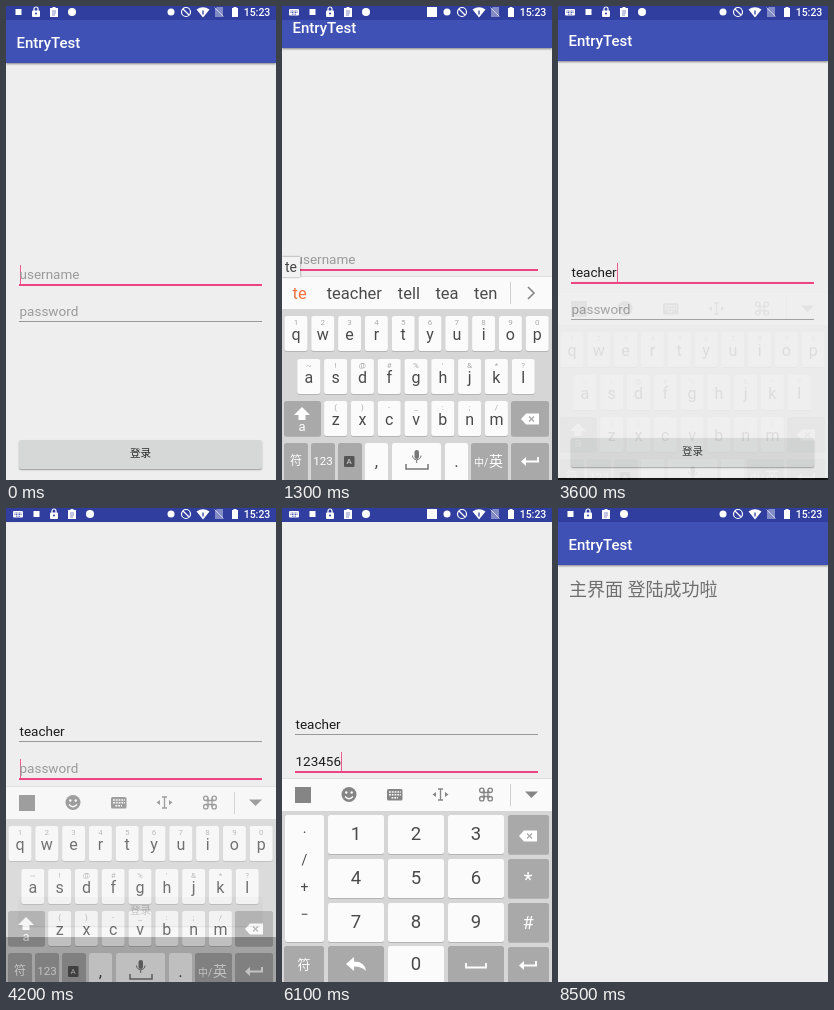
Animation, 270 px wide and 474 px high, one loop 9.4 s. Source, as an HTML page:

```html
<!DOCTYPE html>
<html lang="zh">
<head>
<meta charset="utf-8">
<title>Login form</title>
<style>
html, body { margin: 0; width: 100%; height: 100%; overflow: hidden; background: #000; }
body, svg text { font-family: Roboto, "Noto Sans CJK SC", "Noto Sans CJK", sans-serif; }
#stage { position: relative; width: 270px; height: 474px; overflow: hidden; background: #000; }
#stage > *, .screen > * { position: absolute; box-sizing: border-box; }
.screen { left: 0; top: 0; width: 270px; height: 474px; background: #eee; }
.bar {
  left: 0; top: 0; width: 270px; height: 57px; padding: 17px 0 0 10.5px;
  background: #3f51b5; color: #fff; font-size: 15px; font-weight: 500; line-height: 40px;
  box-shadow: 0 1px 2px rgba(0, 0, 0, .45);
}
.field { left: 13.5px; width: 242px; height: 20px; display: flex; align-items: center;
  font-size: 13.5px; line-height: 20px; color: #1c1c1c; white-space: pre; }
.field i { width: 1px; height: 19px; margin-right: -1px; background: #f0588f; visibility: hidden; }
.field b { font-weight: 400; color: #9a9a9a; }
.field::after { content: ""; position: absolute; left: -.5px; right: 0; top: 20px; height: 1px; background: #989898; }
.field.focus::after { height: 1.7px; background: #ec4581; }
.field.on i { visibility: visible; }
#user { top: 258px; }
#pass { top: 295px; }
#login {
  left: 13px; top: 434px; width: 243px; height: 29px; border-radius: 2px; background: #d6d7d7;
  box-shadow: 0 1px 1.5px rgba(0, 0, 0, .35);
  font-size: 10.5px; line-height: 28px; text-align: center; color: #222; font-weight: 500;
}
#login.down { background: #c3c4c4; }
#home p { margin: 0; left: 11px; top: 69px; font-size: 18px; line-height: 26px; color: #6f6f6f; white-space: pre; }
#kbd { left: 0; top: 270px; overflow: visible; }
#kbd text, #status text { text-anchor: middle; }
#kbd #words { text-anchor: start; }
#status { left: 0; top: 0; background: #303f9f; }
#popup {
  left: 0; top: 251px; height: 20px; padding: 0 3px; background: #f3f3f3; color: #444;
  font-size: 14px; line-height: 20px; box-shadow: 0 0 2px rgba(0, 0, 0, .5);
}
</style>
</head>
<body>
<div id="stage">
  <div class="screen" id="form">
    <div class="bar">EntryTest</div>
    <div class="field" id="user"><span></span><i></i><b>username</b></div>
    <div class="field" id="pass"><span></span><i></i><b>password</b></div>
    <div id="login">登录</div>
  </div>
  <div class="screen" id="home">
    <div class="bar">EntryTest</div>
    <p>主界面 登陆成功啦</p>
  </div>
  <svg id="kbd" width="270" height="204" viewBox="0 270 270 204"></svg>
  <div id="popup"></div>
  <svg id="status" width="270" height="14" fill="#fff">
    <g id="imeIcon">
      <rect x="7" y="3" width="10" height="6.5" rx="1"/>
      <path d="M8.5 5h7M8.5 6.5h7M10 8.2h4" stroke="#303f9f" stroke-width=".8" stroke-dasharray="1 .5"/>
    </g>
    <g id="notes">
      <rect x="9.5" y="3" width="6" height="6"/>
      <path d="M28 5V3a2 2 0 0 1 4 0v2" fill="none" stroke="#fff" stroke-width="1.2"/>
      <rect x="26" y="4.5" width="8" height="6.5" rx="1"/>
      <circle cx="30" cy="7.6" r="1" fill="#303f9f"/>
      <path d="M44 2h2.500v-1h3v1H52v9h-8z"/>
      <path d="M46 5h4M46 7h4M46 9h3" stroke="#303f9f" stroke-width=".6"/>
      <circle cx="66" cy="6" r="4"/>
    </g>
    <rect id="imeMark" x="145" y="1" width="10" height="10"/>
    <circle cx="165" cy="6" r="3.500"/>
    <g fill="none" stroke="#fff" stroke-width="1.2"><circle cx="180" cy="6" r="4.500"/><path d="M177 3l6 6"/></g>
    <path d="M190.500 3.500q6.500-4.500 13 0L197 11.500z"/>
    <path d="M197 4.500v4" stroke="#303f9f" stroke-width="1.3"/>
    <path d="M209 3l2-2h6v10h-8z" opacity=".4"/>
    <path d="M208.500 1.500l9 9" stroke="#fff" stroke-width=".9" opacity=".7"/>
    <path d="M226 2h1.500V1h3v1h1.500v9h-6z"/>
    <text x="251" y="10" font-size="10.5" font-weight="500">15:23</text>
  </svg>
</div>
<script>
const $ = id => document.getElementById(id);
const LOOP = 9400;
const DARK = '#a9a9a9', LIGHT = '#fbfbfb', INK = '#4a4a4a', ORANGE = '#f0733f', ICON = '#858585';

// [key, pressed at, released at]
const LETTERS = [['t', 700, 900], ['e', 1100, 1300], ['a', 1600, 1700],
  ['c', 1900, 2000], ['h', 2100, 2200], ['e', 2300, 2400]];
const DIGITS = [5100, 5300, 5500, 5700, 5800, 6000].map((p, i) => [String(i + 1), p, p + 100]);
const COMMIT = 2900, TO_PASS = 4100, TO_DIGITS = 4900;
const CURSOR = [[0, 1100], [1600, 2100], [2600, 4600], [5100, 6600], [7000, 7500], [7800, LOOP]];
const WORDS = {
  t: 't the to that this',
  te: 'te teacher tell tea ten',
  tea: 'tea teacher team tears',
  teac: 'teac teacher teach',
  teach: 'teach teacher teaching',
  teache: 'teache teacher teachers'
};

// Keyboard moves: start, opening, pan before, pan after
const MOVES = [[-900, 0, 0, 0], [100, 1, 0, 15], [3500, 0, 15, 0], [TO_PASS, 1, 0, 52], [6400, 0, 52, 0]];
const PAN = [.35, .865, .98, 1];
const ALPHA = [[.6, .1, 0, 0], [.25, .76, 1, 1]];
const DROP = [[4, 16, 20, 20], [16, 8, 1, 0]];

const rect = (x, y, w, h, fill, more = '') =>
  `<rect x="${x}" y="${y}" width="${w}" height="${h}" fill="${fill}" ${more}/>`;
const text = (x, y, s, size, fill = INK) =>
  `<text x="${x}" y="${y + size * .35}" font-size="${size}" fill="${fill}">${s}</text>`;
const line = (d, color, w = 1.5) => `<path d="${d}" fill="none" stroke="${color}" stroke-width="${w}"/>`;
const key = (x, y, w, h, fill = LIGHT, name = '') =>
  rect(x, y + 1, w, h, '#b4b4b4', 'rx="2.5"') +
  rect(x, y, w, h, fill, `rx="2.5" data-key="${name}"`);

const backspace = (x, y) =>
  `<path d="M${x - 9} ${y}l5-5.500h13v11h-13z" fill="#fff"/>` +
  line(`M${x - 1} ${y - 2.5}l5 5m0-5l-5 5`, DARK, 1.3);
const enter = (x, y) =>
  line(`M${x + 8} ${y - 4}v4.500h-13`, '#fff', 2) +
  `<path d="M${x - 9} ${y + .5}l5-4.500v9z" fill="#fff"/>`;
const space = (x, y, color) => line(`M${x - 10} ${y - 2}v4.500h20v-4.500`, color, 1.8);

const ROWS = [
  ['qwertyuiop', '1234567890', 14, 310],
  ['asdfghjkl', "~!@#%'&*?", 26.8, 353],
  ['zxcvbnm', '()-_:;/', 53.6, 395]
];
const spot = {};

function letterKeys() {
  let s = '';
  for (const [chars, hints, x0, y] of ROWS) {
    [...chars].forEach((c, i) => {
      const x = x0 + i * 26.8;
      spot[c] = [x, y];
      s += key(x - 11.5, y, 23, 35, LIGHT, c) +
        text(x, y + 6, hints[i].replace('&', '&amp;'), 8, '#ababab') + text(x, y + 18.5, c, 16);
    });
  }
  s += key(2, 395, 37, 35, DARK) + '<path d="M20 401l8 8h-4.500v5h-7v-5H12z" fill="#fff"/>' + text(20, 420, 'a', 13, '#fff');
  s += key(229, 395, 38, 35, DARK) + backspace(248, 413);
  s += key(2, 437, 24, 40, DARK) + text(14, 455, '符', 12, '#fff');
  s += key(29, 437, 24, 40, DARK, '123') + text(41, 455, '123', 11.5, '#fff');
  s += key(56, 437, 24, 40, DARK) + rect(62, 450, 10.5, 11, '#555', 'rx="1"') + text(67.2, 455.5, 'A', 8, '#ddd');
  s += key(83, 437, 23, 40) + text(94.500, 455, ',', 17);
  s += key(110, 437, 49, 40) + rect(132.5, 444, 4.5, 9, '#777', 'rx="2.2"') +
    line('M130.500 449.500a4.200 4.200 0 0 0 8.500 0M134.700 454v3', '#777', 1) +
    line('M124 458v5h22v-5', '#777');
  s += key(163, 437, 23, 40) + text(174.5, 455, '.', 17);
  s += key(189, 437, 37, 40, DARK) + text(199, 456, '中/', 10, '#fff') + text(214, 455, '英', 14, '#fff');
  return s + key(229, 437, 38, 40, DARK) + enter(248, 455);
}

function digitKeys() {
  let s = key(3, 307, 39, 127);
  ['·', '/', '+', '−'].forEach((c, i) => s += text(22.5, 325 + i * 27, c, 14));
  for (let n = 1; n < 10; n++) {
    const x = 46 + (n - 1) % 3 * 60, y = 307 + Math.floor((n - 1) / 3) * 44;
    s += key(x, y, 56, 39, LIGHT, n) + text(x + 28, y + 19, n, 18.5);
  }
  for (let i = 0; i < 4; i++) s += key(226, 307 + i * 44, 41, 39, DARK);
  s += backspace(246, 328) + text(246, 372, '*', 20, '#fff') + text(246, 415, '#', 18, '#fff') + enter(246, 457);
  s += key(2, 438, 40, 40, DARK) + text(22, 456, '符', 13, '#fff');
  s += key(46, 438, 56, 40, DARK) +
    '<path d="M64 456l8-7v4.500q11 0 12 9.500q-4-4.500-12-4.500v4.500z" fill="#fff"/>';
  s += key(106, 438, 56, 40) + text(134, 456, '0', 18.5);
  return s + key(166, 438, 56, 40, DARK) + space(194, 457, '#fff');
}

function toolIcons() {
  let s = rect(13, 279, 16, 16, ICON);
  s += `<circle cx="67" cy="286.500" r="7.500" fill="${ICON}"/>` +
    '<circle cx="64.300" cy="284.500" r="1.200" fill="#fff"/><circle cx="69.700" cy="284.500" r="1.200" fill="#fff"/>' +
    line('M63 288.500q4 4.500 8 0', '#fff', 1.3);
  s += rect(105, 281, 15.5, 11.5, ICON, 'rx="1.5"') +
    '<path d="M107 284h12M107 286.700h12M109.500 289.800h6.500" stroke="#fff" stroke-width="1.400" stroke-dasharray="1.800 1"/>';
  s += line('M156 281h5m-5 11h5M158.500 281v11', ICON, 1.3) +
    `<path d="M154 284v5l-3.500-2.500zM163 284v5l3.500-2.500z" fill="${ICON}"/>`;
  const loop = (x, y) => `<circle cx="${x}" cy="${y}" r="2.200"/>`;
  s += `<g fill="none" stroke="${ICON}" stroke-width="1.300">` +
    [[199.8, 282.3], [208.2, 282.3], [199.8, 290.7], [208.2, 290.7]].map(p => loop(...p)).join('') +
    '<path d="M202 282v9M206 282v9M200 284.500h8M200 288.500h8"/></g>';
  return s + `<path d="M243 283.500h13l-6.500 6.500z" fill="${ICON}"/>`;
}

$('kbd').innerHTML =
  rect(0, 270, 270, 204, '#d6d6d6') + rect(0, 270, 270, 33, '#fafafa') +
  line('M0 270.500h270', '#dedede', 1) +
  `<g id="tools">${toolIcons()}</g>` +
  `<g id="picks">${rect(73, 271, 71, 32, '#e3e3e3', 'id="pickBg"')}
    <text id="words" x="10.500" y="293" font-size="16.500"></text>${line('M246 281l6 6-6 6', ICON, 1.6)}</g>` +
  line('M228.500 276v22', '#cfcfcf', 1) +
  `<g id="abc">${letterKeys()}</g><g id="num">${digitKeys()}</g><g id="bubble"></g>`;

const show = (id, on) => { $(id).style.display = on ? '' : 'none'; };
const within = (t, [a, b]) => t >= a && t < b;
const typed = (list, t) => list.filter(k => k[2] <= t).map(k => k[0]).join('');
const held = (list, t) => (list.find(k => within(t, [k[1], k[2]])) || [''])[0];
const keys = [...document.querySelectorAll('[data-key]')].filter(k => k.dataset.key);
keys.forEach(k => { k.base = k.getAttribute('fill'); });

function setField(id, value, focus, cursor) {
  const f = $(id);
  f.children[0].textContent = value;
  f.children[2].style.display = value ? 'none' : '';
  f.classList.toggle('focus', focus);
  f.classList.toggle('on', focus && cursor);
}

function drawKeyboard(t) {
  const [start, open, from, to] = MOVES.filter(m => m[0] <= t).pop();
  const k = Math.min(3, (t - start) / 100);
  $('form').style.transform = `translateY(${-(from + (to - from) * PAN[k])}px)`;
  $('kbd').style.opacity = ALPHA[open][k];
  $('kbd').style.transform = `translateY(${DROP[open][k]}px)`;
  const icon = start > 0 && (open ? k >= 1 : k < 2);
  show('imeIcon', icon);
  $('notes').setAttribute('transform', `translate(${icon ? 18 : 0})`);
  show('imeMark', start > 0 && (open ? k >= 2 : k < 1));
  show('abc', t < TO_DIGITS);
  show('num', t >= TO_DIGITS);

  const letter = held(LETTERS, t);
  const down = letter || held(DIGITS, t) || (within(t, [4800, TO_DIGITS]) ? '123' : '');
  keys.forEach(e => e.setAttribute('fill', e.dataset.key === down ? (down === '123' ? '#8c8c8c' : '#c9c9c9') : e.base));
  if (letter) {
    const [x, y] = spot[letter];
    $('bubble').innerHTML = rect(x - 18, y - 38, 36, 36, '#fff', 'rx="3" stroke="#bbb" stroke-width=".8"') +
      text(x, y - 20, letter, 22);
  } else $('bubble').innerHTML = '';
}

function drawWords(t) {
  const draft = t < COMMIT ? typed(LETTERS, t) : '';
  show('popup', draft);
  show('picks', draft);
  show('tools', !draft);
  $('popup').textContent = draft;
  if (!draft) return;
  const picked = t >= 2600 ? 1 : 0;
  show('pickBg', picked);
  $('words').innerHTML = WORDS[draft].split(' ').map((w, i) =>
    `<tspan dx="${[0, 20][i] ?? 15.5}" fill="${i === picked ? ORANGE : INK}">${w}</tspan>`).join('');
}

function draw(t) {
  const cursor = CURSOR.some(c => within(t, c));
  setField('user', t >= COMMIT ? 'teacher' : '', t < TO_PASS, cursor);
  setField('pass', typed(DIGITS, t), t >= TO_PASS, cursor);
  $('login').classList.toggle('down', within(t, [7300, 7500]));
  drawKeyboard(t);
  drawWords(t);
  const k = Math.min(2, (t - 8300) / 100);
  show('home', k >= 0);
  if (k >= 0) {
    $('home').style.opacity = [.3, .88, 1][k];
    $('home').style.transform = `translateY(${[20, 4, 0][k]}px)`;
  }
}

let last = -1;
function tick() {
  const t = Math.floor(performance.now() % LOOP / 100) * 100;
  if (t !== last) draw(last = t);
  requestAnimationFrame(tick);
}
tick();
</script>
</body>
</html>
```
